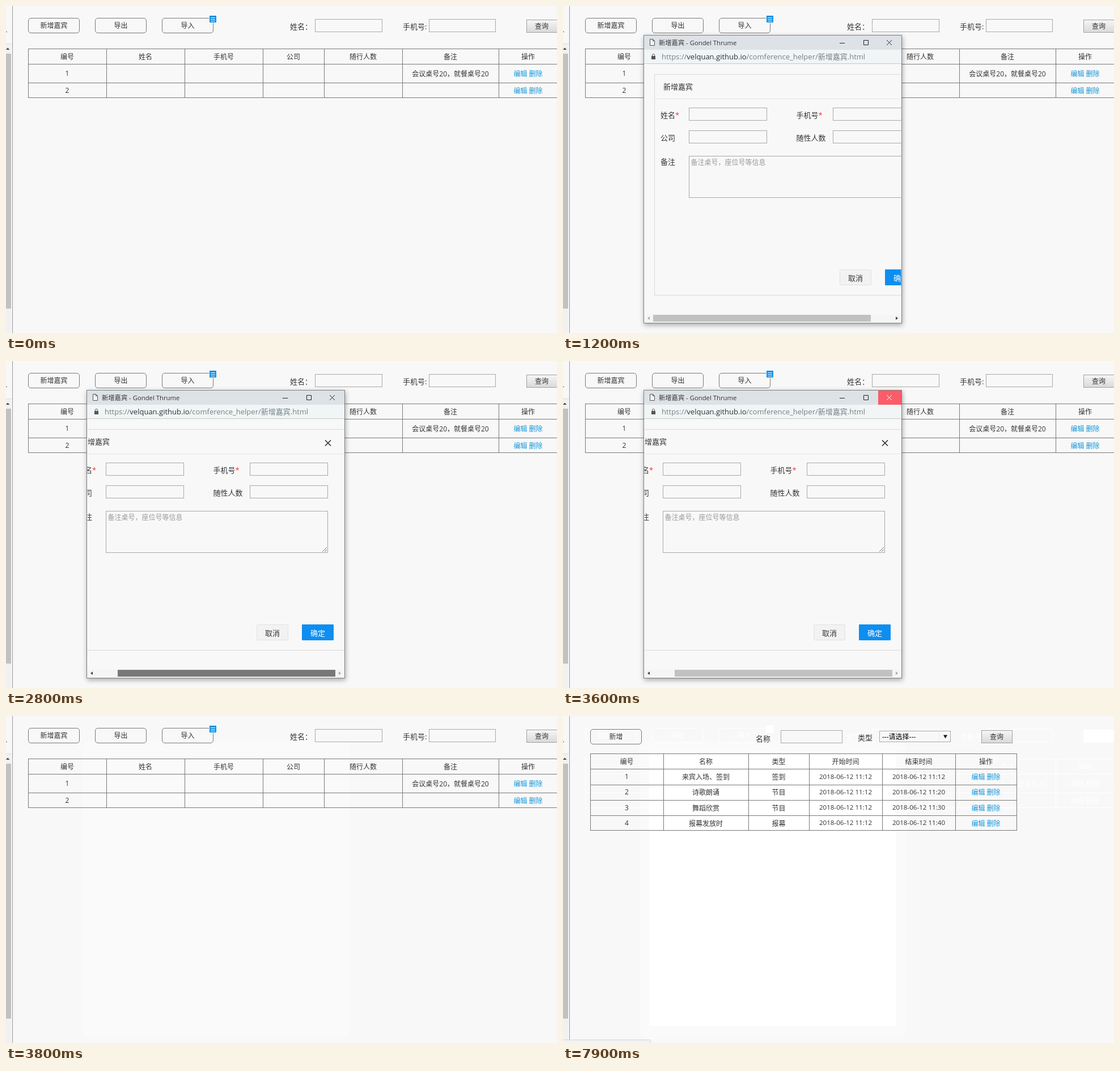
An HTML page for the animation above (8 s loop, 972 by 576 pixels).

```html
<!DOCTYPE html>
<html lang="zh">
<head>
<meta charset="utf-8">
<style>
html, body { margin: 0; width: 100%; height: 100%; overflow: hidden; background: #f8f8f8; }
svg { display: block; }
text { font-family: "Open Sans", "Noto Sans CJK SC", "Noto Sans CJK", "Noto Sans", sans-serif; }
.ghost text, .ghost .solid { fill: #fff; }
.ghost rect, .ghost path { stroke: #fff; }
</style>
</head>
<body>
<svg id="stage" width="972" height="576" viewBox="0 0 972 576">
  <defs>
    <linearGradient id="grey" x2="0" y2="1"><stop stop-color="#f6f6f6"/><stop offset="1" stop-color="#d9d9d9"/></linearGradient>
    <clipPath id="view"><rect x="143.5" y="102" width="453" height="455"/></clipPath>
  </defs>
</svg>
<script>
const LINE = '#797979', INK = '#333', LINK = '#1296db';

const rect = (x, y, w, h, fill = 'none', stroke = 'none', more = '') =>
  `<rect x="${x}" y="${y}" width="${w}" height="${h}" fill="${fill}" stroke="${stroke}" ${more}/>`;
const path = (d, stroke, fill = 'none', more = '') =>
  `<path d="${d}" stroke="${stroke}" fill="${fill}" ${more}/>`;
const group = (id, body, more = '') => `<g id="${id}" ${more}>${body}</g>`;

// y is the middle of the line of text
const label = (x, y, s, size = 12, fill = INK, anchor = 'start') =>
  `<text x="${x}" y="${y + size * .37}" font-size="${size}" fill="${fill}" text-anchor="${anchor}">${s}</text>`;
const centred = (x, y, s, size = 12, fill = INK) => label(x, y, s, size, fill, 'middle');

const pill = (x, y, s) =>
  rect(x + .5, y + .5, 90, 26, 'none', LINE, 'rx="4.5"') + centred(x + 45.5, y + 13.5, s);
const field = (x, y, w, h = 22) => rect(x + .5, y + .5, w, h, '#f8f8f8', '#a9a9a9');
const greyButton = (x, y, s) =>
  rect(x + .5, y + .5, 54, 22, 'url(#grey)', '#a0a0a0', 'class="solid"') + centred(x + 27, y + 12, s);

const grid = (xs, ys) => {
  const [l, r, t, b] = [xs[0], xs.at(-1), ys[0], ys.at(-1)];
  return path(xs.map(x => `M${x + .5} ${t}V${b + 1}`).join('') +
    ys.map(y => `M${l} ${y + .5}H${r + 1}`).join(''), LINE);
};
const cells = (xs, ys, rows) => rows.map((row, r) => row.map((s, c) => {
  const latin = /^[\d\-: ]+$/.test(s);
  return s && centred((xs[c] + xs[c + 1]) / 2, ys[r] - (latin ? 1.3 : 0), s,
    latin && s.length > 1 ? 11.6 : 12, s.startsWith('编辑') ? LINK : INK);
}).join('')).join('');

const EDIT = '编辑 删除';

// guest list
const guestX = [39, 177, 315, 453, 561, 699, 869, 973];
const guests =
  pill(39, 21, '新增嘉宾') + pill(157, 21, '导出') + pill(275, 21, '导入') +
  rect(358.5, 16.5, 13, 13, '#0e8ee0', '#fff', 'class="solid"') +
  path('M361 20.5h8m-8 3h8m-8 3h8', '#fff') +
  label(501, 36.5, '姓名：', 13) + field(545, 23, 118) +
  label(700, 36.5, '手机号:', 13) + field(746, 23, 117) +
  greyButton(918, 24, '查询') +
  grid(guestX, [75, 102, 135, 161]) +
  cells(guestX, [90, 119.5, 149.5], [
    ['编号', '姓名', '手机号', '公司', '随行人数', '备注', '操作'],
    ['1', '', '', '', '', '会议桌号20，就餐桌号20', EDIT],
    ['2', '', '', '', '', '', EDIT]]);

// programme list
const planX = [48, 177, 327, 434, 563, 692, 800];
const planY = [66, 93, 121, 148, 175, 201];
const start = '2018-06-12 11:12';
const plan =
  pill(48, 23, '新增') +
  label(340, 40, '名称', 13) + field(384, 25, 108) +
  label(520, 38, '类型', 13) + rect(558.5, 26.5, 125, 19, '#f8f8f8', '#a9a9a9') +
  label(563, 37, '---请选择---', 12, '#000') +
  path('M663.5 28v17', '#eee') + path('M671 33.5h7l-3.5 6z', 'none', '#111') +
  greyButton(738, 25, '查询') +
  cells(planX, [81, 108, 135, 162.5, 189.5], [
    ['编号', '名称', '类型', '开始时间', '结束时间', '操作'],
    ['1', '来宾入场、签到', '签到', start, start, EDIT],
    ['2', '诗歌朗诵', '节目', start, '2018-06-12 11:20', EDIT],
    ['3', '舞蹈欣赏', '节目', start, '2018-06-12 11:30', EDIT],
    ['4', '报幕发放时', '报幕', start, '2018-06-12 11:40', EDIT]]);

// left edge of the browser pane
const edge =
  rect(0, 0, 9, 576, '#f1f1f1') + rect(0, 0, 11, 67, '#f8f8f8') +
  path('M0 66.5h11', '#ddd') + path('M0 45.5h2', '#555') +
  path('M0 77l3-3.5 3.5 3.5z', 'none', '#444') +
  rect(0, 84, 9, 449, '#c1c1c1') + path('M11.5 0V576', '#999');
const status = path('M-1 570.5H152q2.5 0 2.5 2.5V577H-1z', '#d5d5d5', '#f2f2f2');

// pop-up window
const red = '<tspan fill="#f33">*</tspan>';
const form =
  rect(161.5, 120.5, 492, 389, 'none', '#dadada') + path('M162 163.5H653', '#e4e4e4') +
  label(177, 142, '新增嘉宾', 13) +
  path('M609 139.5l10 10m0-10l-10 10', INK, 'none', 'stroke-width="1.7"') +
  label(172, 192.5, '姓名' + red, 13) + field(222, 179, 137) +
  label(411.5, 192.5, '手机号' + red, 13) + field(476, 179, 137) +
  label(172, 232.5, '公司', 13) + field(222, 219, 137) +
  label(411.5, 232.5, '随性人数', 13) + field(476, 219, 137) +
  label(172, 274.5, '备注', 13) + field(222, 264, 391, 73) +
  label(225.5, 276, '备注桌号，座位号等信息', 12, '#999') +
  path('M604 336l8-8m-4 8l4-4', '#777') +
  rect(488.5, 464.5, 55, 27, '#f2f2f2', '#e2e2e2', 'rx="1"') + centred(516, 479, '取消', 13) +
  rect(568, 464, 56, 28, '#0d8ef0', 'none', 'rx="1"') + centred(596, 479, '确定', 13, '#fff');

const popup =
  rect(142.5, 51.5, 455, 507, '#f8f8f8', '#7b8280', 'style="filter:drop-shadow(1px 3px 4px rgba(0,0,0,.33))"') +
  rect(143, 52, 454, 25, '#dde2e7') +
  path('M153.5 58.5h5l3 3v8h-8zM158.5 58.5v3h3', '#555', '#f4f5f6') +
  label(169, 64.5, '新增嘉宾 - Gondel Thrume', 11.3) +
  path('M488 65.5h9M530.5 60.5h8v8h-8z', '#222') +
  rect(556, 52, 41, 25, '#fb5c68', 'none', 'id="hot"') +
  path('M571 60l9 9m0-9l-9 9', '#222', 'none', 'id="cross"') +
  rect(143, 77, 454, 24, '#f1f5f5', 'none', 'id="bar"') + path('M143 101.5h454', '#c3c9cb') +
  path('M157.5 88v-1.5a2 2 0 0 1 4 0V88', '#555') + rect(156, 88, 7, 6, '#555') +
  label(174, 89.5, 'https://<tspan fill="#263238">velquan.github.io</tspan>/comference_helper/新增嘉宾.html', 13, '#748087') +
  group('clip', group('form', form), 'clip-path="url(#view)"') +
  rect(143, 543, 454, 14, '#f5f5f5') + rect(159, 544, 384, 12, '#c1c1c1', 'none', 'id="thumb"') +
  path('M153 547v6l-4-3z', 'none', '#aaa', 'id="back"') +
  path('M587 547v6l4-3z', 'none', '#444', 'id="next"');

stage.insertAdjacentHTML('beforeend',
  group('halo', rect(135, 44, 471, 525, '#fafafa', 'none', 'rx="16"')) +
  group('blank', rect(152, 62, 435, 484, '#fff')) +
  group('guests', guests) + group('plan', plan) + group('planGrid', grid(planX, planY)) +
  group('edge', edge) + group('status', status) + group('popup', popup));

const $ = id => document.getElementById(id);
const show = (id, on) => $(id).style.display = on ? '' : 'none';
const set = (id, name, value) => $(id).setAttribute(name, value);

// size and opacity of the window while it opens and closes
function pose(t) {
  if (t < 600) return [.956, .45];
  if (t < 700) return [.992, .9];
  return t < 3700 ? [1, 1] : [.956, .3];
}

function draw(now) {
  const t = Math.floor(now % 8000 / 100) * 100;
  const scroll = Math.round(46 * Math.min(1, Math.max(0, (t - 2500) / 300)));
  const closing = t >= 3400;
  const [size, alpha] = pose(t);

  show('halo', t >= 3800);
  show('blank', t >= 7000);
  show('status', t >= 7000);
  set('guests', 'class', t >= 7100 ? 'ghost' : '');
  show('plan', t >= 7700);
  show('planGrid', t >= 7900);

  show('popup', t >= 500 && t < 3800);
  set('popup', 'opacity', alpha);
  set('popup', 'transform', `translate(370 304.5) scale(${size}) translate(-370 -304.5)`);
  set('form', 'transform', `translate(${-scroll} 0)`);
  set('thumb', 'x', 159 + Math.round(scroll * 38 / 46));
  set('thumb', 'fill', t < 2400 || t >= 3300 ? '#c1c1c1' : t < 2600 ? '#a8a8a8' : '#787878');
  set('back', 'fill', scroll ? '#444' : '#aaa');
  set('next', 'fill', scroll < 46 ? '#444' : '#aaa');
  set('bar', 'fill', t < 1200 ? '#f4f6f7' : '#f1f5f5');
  show('hot', closing);
  set('cross', 'stroke', closing ? '#fff' : '#222');
}

const begin = performance.now();
function tick() {
  draw(performance.now() - begin);
  requestAnimationFrame(tick);
}
tick();
</script>
</body>
</html>
```
